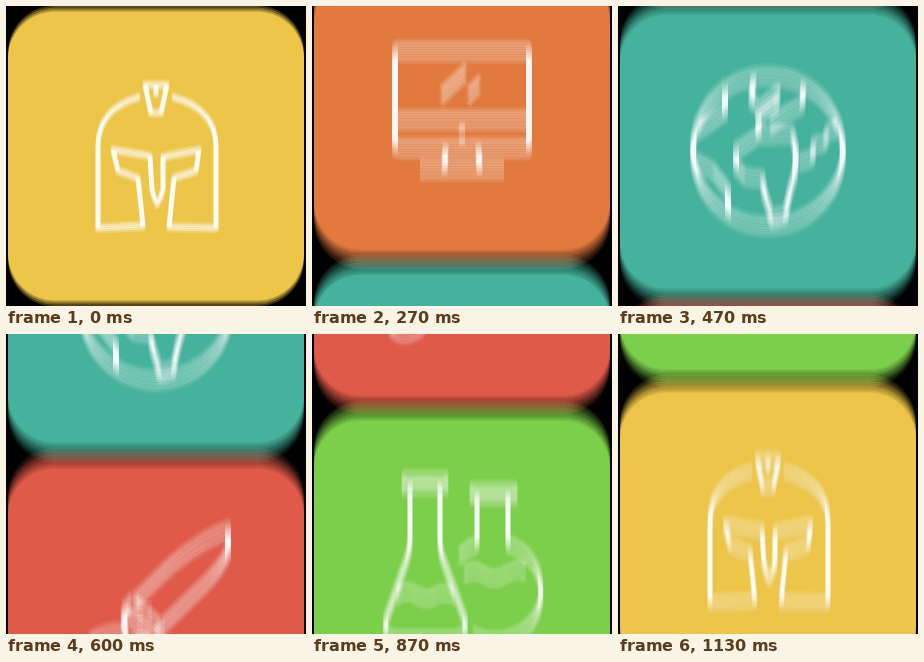
Write an HTML page with a canvas that moves like this. It is 300x300 px and loops after 1190 ms.

```html
<!DOCTYPE html>
<html lang="en">
<head>
<meta charset="utf-8">
<title>Icon reel</title>
<style>
  html, body { margin: 0; width: 100%; height: 100%; overflow: hidden; background: #000; }
  canvas { display: block; width: 100vw; height: 100vh; }
</style>
</head>
<body>
<canvas id="stage" width="300" height="300"></canvas>
<script>
const SIZE = 300, LOOP = 1190, STEPS = 18;
const ctx = document.getElementById('stage').getContext('2d');

// Each tile: background, stroke width, icon outline
const tiles = [
  ['#edc549', 5, `
    M134 91 C106 98 92 116 92 140 V222 L137 220 L132 172 L112 165 L107 144 L144 150
    L146 184 Q148 192 151 198 Q155 192 157 184 L157 151 L193 144 L190 165 L168 172
    L163 221 L210 222 V140 C210 116 195 98 166 91
    M139 79 H161 L155 107 H145 Z M150 79 V90`],
  ['#e27a3f', 6, `
    M83 92 Q83 89 86 89 H214 Q217 89 217 92 V183 Q217 186 214 186 H86 Q83 186 83 183 Z
    M83 158 H217 M150 169 V175
    M134 187 L132 207 M166 187 L168 207 M108 208 H192
    M129 134 L154 110 M156 134 L168 122`],
  ['#45b29d', 6, `
    M225 150 A75 75 0 1 1 75 150 A75 75 0 1 1 225 150
    M78 131 L92 122 L107 111 V85
    M77 160 L95 170 L110 190 V212
    M136 78 L133 99 L141 107 L160 92 L158 103 L140 118 L141 134
    M186 84 L184 104 L166 114 L152 124
    M141 134 L174 133 L178 150 L177 172 L172 190 L167 214 L154 217 L147 194 L144 178
    L127 176 L118 165 V150 Z
    M223 126 L210 131 L206 142 L196 144 L194 157 L181 162`],
  ['#df5a49', 6, `
    M128 147 L160 115 Q190 87 222 75 V97 Q215 113 198 130 L155 172
    M126 146 L157 173 M117 157 L147 184 M126 146 L117 157 M157 173 L147 184
    M134 163 V165 M143 155 V157
    M117 160 L121 190 Q120 211 107 221 Q92 231 80 221 Q77 202 86 186 Q98 177 117 178
    M121 190 L147 184
    M105 205 A5 5 0 1 1 95 205 A5 5 0 1 1 105 205`],
  ['#7ccf4a', 5, `
    M92 72 H134 V79 H92 Z M98 79 V138 Q96 150 91 163 L74 212 Q70 230 84 231 H143
    Q156 230 153 212 L135 163 Q129 148 128 138 V79
    M83 190 Q94 180 104 187 T124 188 T145 190
    M160 83 H203 V89 H160 Z M165 89 V137 Q155 140 147 149
    M196 89 V137 C217 143 229 161 229 184 C229 214 207 233 182 233 Q171 233 161 227
    M152 167 Q162 160 172 167 T193 167 T214 164`]
].map(([color, width, icon]) => {
  const tile = document.createElement('canvas');
  tile.width = tile.height = SIZE;
  const c = tile.getContext('2d');
  c.fillStyle = '#000';
  c.fillRect(0, 0, SIZE, SIZE);
  c.fillStyle = color;
  c.beginPath();
  c.roundRect(2, 2.5, 296, 295, 47);
  c.fill();
  c.strokeStyle = 'rgba(255,255,255,.94)';
  c.lineWidth = width;
  c.lineJoin = 'round';
  c.stroke(new Path2D(icon));
  return tile;
});

// Even travel with a quick start and a soft landing
function scrollAt(k) {
  if (k < 3) return [0, 84, 170][k];
  if (k > 15) return [1384, 1453][k - 16];
  return 257 + (k - 3) * 86.9;
}

function blurAt(k) {
  if (k === 0) return 7;
  return k > 15 ? 21 - (k - 16) * 2 : 22;
}

function drawStrip(scroll) {
  const first = Math.floor(scroll / SIZE);
  for (let i = first; i < first + 2; i++) {
    ctx.drawImage(tiles[(i + tiles.length) % tiles.length], 0, i * SIZE - scroll);
  }
}

function drawStep(k) {
  const length = blurAt(k), samples = Math.ceil(length / 1.8);
  for (let i = 0; i < samples; i++) {
    ctx.globalAlpha = 1 / (i + 1);
    drawStrip(Math.round(scrollAt(k) + length * ((i + 0.5) / samples - 0.5)));
  }
  ctx.globalAlpha = 1;
}

const starts = Array.from({ length: STEPS }, (_, k) => Math.round(k * 20 / 3) * 10);
const origin = performance.now();
let shown = -1;

function tick() {
  const time = (performance.now() - origin) % LOOP;
  let k = STEPS - 1;
  while (starts[k] > time) k--;
  if (k !== shown) drawStep(shown = k);
  requestAnimationFrame(tick);
}
tick();
</script>
</body>
</html>
```
